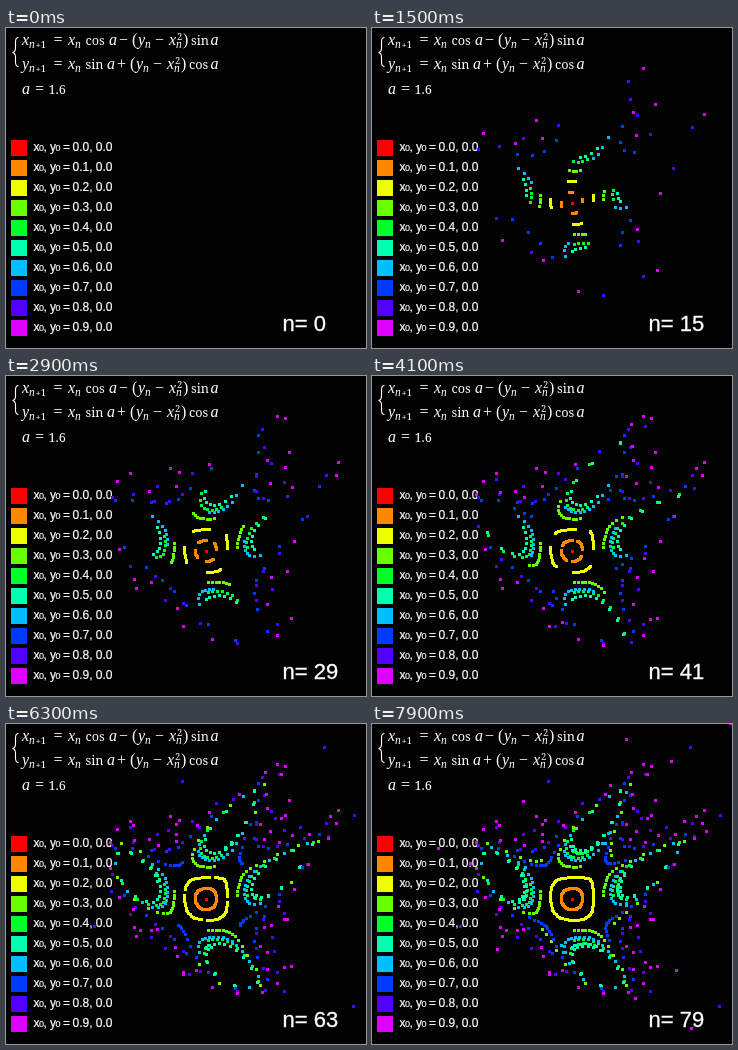
Write an HTML page with a canvas that moves like this. It is 360 by 320 pixels and loops after 8 s.

```html
<!DOCTYPE html>
<html lang="en">
<head>
<meta charset="utf-8">
<title>Quadratic map orbits</title>
<style>
  html, body { margin: 0; width: 100%; height: 100%; overflow: hidden; background: #030303; }
  svg, canvas { position: absolute; left: 0; top: 0; display: block; }
  text { fill: #fff; white-space: pre; }
  .math { font: 16px "Liberation Serif", "Noto Serif", serif; }
  .var { font-style: italic; }
  .small { font-size: 11.5px; }
  .roman { font: 12.7px "Noto Serif", "Liberation Serif", serif; }
  .index { font: 9.5px "Noto Serif", "Liberation Serif", serif; }
  .label { font: 12px "Liberation Sans", Arial, sans-serif; stroke: #fff; stroke-width: .2; }
  .zero { font-size: 9px; }
  .count { font: 22px "Liberation Sans", Arial, sans-serif; stroke: #fff; stroke-width: .3; }
</style>
</head>
<body>
<svg id="stage" width="360" height="320" viewBox="0 0 360 320">
  <path d="M12.5 9.5q-3 0-3 4.5v6q0 4-3 4.5q3 .5 3 4.5v5q0 4.5 3 4.5" fill="none" stroke="#fff" stroke-width="1.1"/>
</svg>
<canvas id="plot" width="360" height="320"></canvas>
<script>
const STEP = 100, COUNT = 80;
const ANGLE = 1.6, SCALE = 320 / 3, CX = 200, CY = 175;
const hues = [0, 32, 64, 96, 130, 161, 195, 226, 259, 292];
const colors = hues.map(h => `hsl(${h}, 100%, 50%)`);
const stage = document.getElementById("stage");
const ctx = document.getElementById("plot").getContext("2d");

function add(tag, attrs, text = "") {
  const el = document.createElementNS("http://www.w3.org/2000/svg", tag);
  for (const key in attrs) el.setAttribute(key, attrs[key]);
  el.textContent = text;
  stage.append(el);
  return el;
}

// Each part is [x, text, style, vertical shift].
function line(y, parts, base) {
  for (const [x, text, style = "", dy = 0] of parts)
    add("text", { x, y: y + dy, class: `${base} ${style}` }, text);
}

const sub = (x, text) => [x, text, "var small", 3];

function equation(y, name, first, sign, last, shift) {
  line(y, [
    [16, name, "var"], sub(23, "n"), [29.5, "+1", "index", 3],
    [47.5, "="], [62, "x", "var"], sub(69, "n"),
    [79.5, first, "roman"], [103 - shift, "a", "var"], [113 - shift, sign],
    [126 - shift, "("], [132 - shift, "y", "var"], sub(139 - shift, "n"),
    [149 - shift, "−"], [163 - shift, "x", "var"], sub(170 - shift, "n"),
    [171 - shift, "2", "index", -5], [177 - shift, ")"],
    [185 - shift, last, "roman"], [204.5, "a", "var"]
  ], "math");
}

equation(17, "x", "cos", "−", "sin", 0);
equation(41, "y", "sin", "+", "cos", 2);
line(66, [[16, "a", "var"], [29, "="], [42.5, "1.6", "roman"]], "math");

colors.forEach((fill, i) => {
  add("rect", { x: 5, y: 112 + 20 * i, width: 16, height: 16, fill });
  line(123 + 20 * i, [
    [27.5, "x"], [33, "0", "zero"], [37.5, ","],
    [44, "y"], [49.5, "0", "zero"], [57, "="],
    [66.5, `0.${i}, 0.0`]
  ], "label");
});
const counter = add("text", { x: 276.5, y: 302.5, class: "count" });

function orbit(x) {
  const c = Math.cos(ANGLE), s = Math.sin(ANGLE), points = [];
  let y = 0;
  for (let n = 1; n < COUNT; n++) {
    const d = y - x * x;
    [x, y] = [x * c - d * s, x * s + d * c];
    points.push([Math.floor(CX + x * SCALE), Math.floor(CY - y * SCALE)]);
  }
  return points;
}
const orbits = colors.map((_, i) => orbit(i / 10));

function draw(n) {
  counter.textContent = `n= ${n}`;
  ctx.clearRect(0, 0, 360, 320);
  orbits.forEach((points, i) => {
    ctx.fillStyle = colors[i];
    for (const [x, y] of points.slice(0, n)) ctx.fillRect(x - 1, y - 1, 3, 3);
  });
}

const start = performance.now();
let shown = -1;
function tick() {
  const n = Math.floor(Math.max(0, performance.now() - start) / STEP) % COUNT;
  if (n !== shown) draw(shown = n);
  requestAnimationFrame(tick);
}
tick();
</script>
</body>
</html>
```
